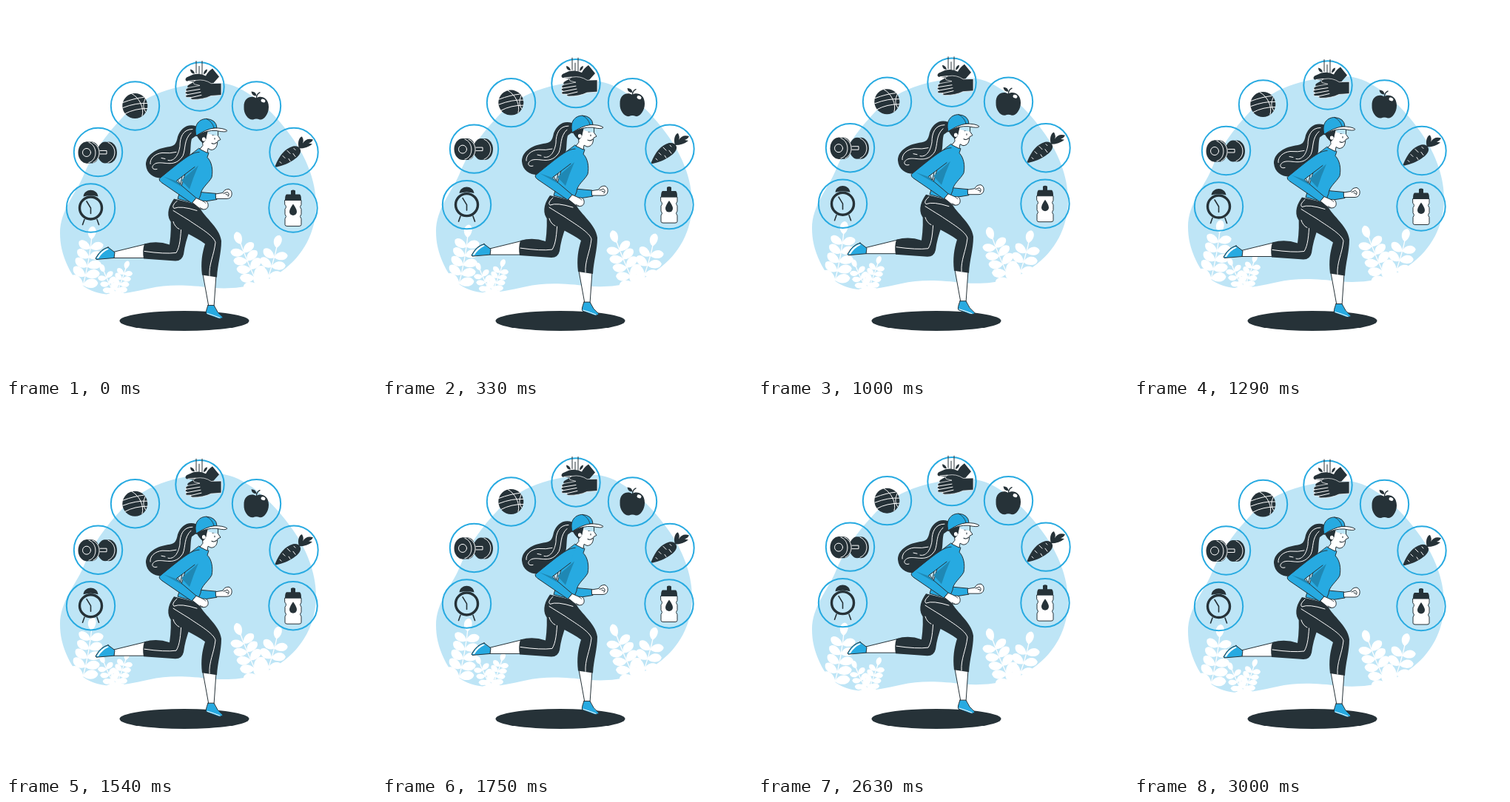
Write an HTML page that moves like this. It is 500 by 500 pixels and loops after 3040 ms.

```html
<!DOCTYPE html>
<html lang="en">
<head>
<meta charset="utf-8">
<title>Healthy habits</title>
<style>
html, body { margin: 0; width: 100%; height: 100%; overflow: hidden; background: #fff; }
svg { display: block; width: 100vw; height: 100vh; }
path, line, circle, ellipse { stroke-linecap: round; stroke-linejoin: round; }
.dark { fill: #263238; }
.blue { fill: #27aae1; }
.white { fill: #fff; }
.edge { stroke: #263238; stroke-width: 1; }
.ink { fill: none; stroke: #263238; }
.thin { fill: none; stroke: #fff; stroke-width: 1; }
.shade { fill: #1f88b4; }
#rings { fill: none; stroke: #27aae1; stroke-width: 2; }
</style>
</head>
<body>
<svg viewBox="0 0 500 500">
  <g id="back">
    <path fill="#bee5f6" d="M73 307C73 277 94 254 104 231C116 201 133 176 160 148C192 116 239 104 289 104C322 106 360 140 388 180C404 203 419 235 419 269C419 305 402 338 372 359C349 377 314 384 279 381C244 377 219 376 193 382C174 386 158 390 138 390C112 388 94 375 84 353C76 336 73 322 73 307Z"/>
    <g id="plants" class="white"></g>
  </g>

  <ellipse class="dark" cx="241" cy="425.5" rx="87.5" ry="13.5"/>

  <g id="front">
    <g id="rings"></g>

    <g id="clock">
      <path class="dark" d="M104.500 258C106 246.500 123 246.500 124.500 258Q114.500 255 104.500 258Z"/>
      <circle class="ink" cx="114.500" cy="273.500" r="15" stroke-width="3.400"/>
      <path class="ink" stroke-width="1.600" d="M109 264.500L114.500 273.500V281M106 289L103.500 296M123 289L125.500 296"/>
    </g>

    <g id="dumbbell">
      <path class="dark" d="M108 184H117C129 186 129 211 117 213H108Z"/>
      <ellipse class="dark" cx="109" cy="198.500" rx="11.500" ry="14.500"/>
      <ellipse class="dark" cx="134" cy="198.500" rx="10.500" ry="14.500"/>
      <ellipse class="dark" cx="139" cy="198.500" rx="11" ry="14.500"/>
      <path class="thin" d="M112 185C124 189 124 209 112 212M117 185C129 190 129 207 118 212M127 196H136V200.500H127M138 185C150 190 150 207 138 212"/>
      <circle class="thin" cx="109" cy="198.500" r="5.500"/>
    </g>

    <g id="ball">
      <circle class="dark" cx="174.300" cy="135.500" r="17"/>
      <path class="thin" d="M170 119C181 125 187 139 184 149M158 131Q174 125 186 124M158 138Q176 131 191 132M161 146Q174 139 191 139M188 126Q183 137 189 144"/>
    </g>

    <g id="wash">
      <path class="ink" d="M257 75V91M265 75V93M261 82V97"/>
      <path class="dark" d="M249 86Q254 87 255 92Q249 92 249 86ZM272 86Q272 91 267 93Q267 87 272 86Z"/>
      <path class="dark" d="M279 85L288 96L280 105L263 109L246 111Q244 109 247 107L254 103L244 102Q241 100 244 97L253 93Q263 91 270 95Q273 89 279 85Z"/>
      <path class="dark" stroke="#fff" stroke-width=".7" d="M291 105V121L277 122Q267 127 252 127Q248 126 250 124L244 124Q241 122 245 120Q240 118 244 116Q241 113 246 111L262 108L254 106Q252 102 257 101Q268 99 277 105Z"/>
      <path class="thin" d="M243 116L262 113M244 120.500L263 117M249 124.500L264 121M246 102L256 101"/>
    </g>

    <g id="apple">
      <path class="dark" d="M338 125C343 121 355 123 355 137C355 147 348 155 343 154Q338 152 334 154C328 155 321 147 321.500 137C321 123 333 121 338 125Z"/>
      <path class="ink" stroke-width="1.400" d="M338.500 126Q338 120 343 117.500"/>
      <path class="dark" d="M338.500 122Q332 122 331.500 116Q338 116 338.500 122Z"/>
      <ellipse class="white" cx="347.500" cy="128.500" rx="3" ry="2.300" transform="rotate(25 347.500 128.500)"/>
    </g>

    <g id="carrot">
      <path class="dark" d="M364 216C369 203 377 193 388 190Q396 189 398 195C400 204 381 215 366 218Q363 218 364 216Z"/>
      <path class="dark" d="M396 193C393 184 397 177 400 177Q403 182 401 186Q406 178 415 181Q413 185 409 186L414 187Q407 193 396 193Z"/>
      <path class="thin" d="M380 196L384 200M374 203L377 206M388 200L391 204M382 207L384 210M389 193L391 195M370 211L372 213"/>
    </g>

    <g id="bottle">
      <path class="dark" d="M385 250Q388 248 391 250V255H397Q399 256 399 263H377Q377 256 379 255H385Z"/>
      <path class="white edge" stroke-width="1.400" d="M377 263H399V269Q396 272 399 275V282Q396 285 399 288V296Q399 298 396 298H380Q377 298 377 296V288Q380 285 377 282V275Q380 272 377 269Z"/>
      <path class="dark" d="M388 268Q393 275 393 278.500A5 5 0 0 1 383 278.500Q383 275 388 268Z"/>
    </g>

    <g id="runner">
      <path class="dark" d="M257 163C245 159 236 166 232 177C230 187 228 190 218 191C200 194 189 203 189 215C190 228 201 234 212 233C224 230 233 224 242 215C252 205 248 190 251 180L258 175Z"/>
      <path class="thin" d="M252 167C239 167 235 178 235 190C233 204 226 211 219 209M250 172C240 181 243 194 239 203C228 220 214 210 203 213C195 216 197 223 204 221M230 198Q222 200 211 199C201 200 194 207 195 214M210 206L215 207"/>

      <path class="blue edge" d="M262 252L284 254L285 262L260 266Z"/>
      <path class="white edge" d="M283.500 254.500L293 253Q295 248 301 248Q306 250 305 256Q304 261 298 261L284 261Z"/>
      <path class="ink" d="M294 254L299 252Q303 254 300 258M297 255L300 256"/>

      <path class="white edge" d="M190 322L145 333L146 341L189 341Z"/>
      <path class="blue edge" d="M138 326.500L147 333.500L146 341L122 343Q120 342 122 340Q128 329 138 326.500Z"/>
      <path class="white" d="M137 328Q128 331 122.500 341.500L125 341.500Q130 333 139 329Z"/>
      <path class="dark" d="M222 282Q224 302 221 323Q204 317 187 322Q184 331 186 342L229 345Q238 345 240 336Q242 320 249 302Z"/>
      <path class="thin" d="M237 296C236 313 235 326 230 334Q215 336 187 332"/>

      <path class="white edge" d="M266 363L274 407H281L284 364Z"/>
      <path class="blue edge" d="M273 405H281Q285 415 293 421Q292 423.500 287 423L271 417Q269 415 273 405Z"/>
      <path class="thin" stroke-width="1.500" d="M272 416Q282 419 289 422"/>
      <path class="dark" d="M227 261L260 269C264 283 289 299 291 318C291 335 286 349 285 367L265 364C263 347 265 335 269 322C256 312 234 304 222 291C216 281 221 269 227 261Z"/>
      <path class="thin" d="M231 264Q223 271 227 274Q236 270 258 277M226 277Q234 282 247 290C260 299 281 311 283 320C281 338 274 349 275 365M226 292Q228 299 234 302"/>

      <path class="blue edge" d="M261 193L274 199L272 205C278 211 280 222 278 232C274 240 263 247 263 256L258 268L232 261L241 231L249 202Z"/>
      <path class="shade" d="M260 216L237 236L248 248Q253 232 260 216Z"/>
      <path fill="#bee5f6" class="edge" stroke-width=".7" d="M232 235L238 231L236 241Z"/>
      <path class="blue edge" d="M261 198C251 198 240 207 207 234Q207 237 210 239L251 267L257 260L230 237L255 218"/>
      <path class="shade" d="M213 231L230 237L240 246Z"/>
      <path class="white edge" d="M252 266L257 260L266 264Q272 263 273 268Q274 273 270 275Q264 277 259 272Z"/>
      <path class="ink" stroke-width=".8" d="M266 264L270 267M262 273L266 275"/>

      <path class="white edge" d="M265 180L266 189L262 194L272 199L273 193L277 195Q283 195 285 189L286 183L290 181L286.500 176V168H266Z"/>
      <path class="dark" d="M257 174L273 169L271 177Q271 182 266 186Q260 181 257 174Z"/>
      <path class="white" d="M265 179Q269 176 270 181Q268 185 265 182Z"/>
      <path class="ink" stroke-width="1.100" d="M278 186Q282 188 284.500 185M282 179V180.500M279 175L284 174"/>
      <path fill="#bee5f6" d="M273 169L286 169L286 176Q280 175 273 173Z"/>
      <path class="blue edge" d="M257 176C253 160 262 153 271 153Q284 154 285 165Q271 167 257 176Z"/>
      <path class="white edge" d="M281 165.500Q294 165 299 169Q298 172 284 169Q271 168 257 176Q270 167 281 165.500Z"/>
      <path class="ink" stroke-width=".8" d="M271 153Q279 157 281 165"/>
    </g>
  </g>
</svg>
<script>
const $ = id => document.getElementById(id);

const rings = [[114.5, 273.5], [124.5, 198], [174.5, 135.5], [262, 109.5], [338.5, 135.5], [389, 198], [388, 273.5]];
$('rings').innerHTML = rings.map(([x, y]) => `<circle cx="${x}" cy="${y}" r="32.7"/>`).join('');

// A stem from base to tip with pairs of leaves and one at the tip
function sprig(x0, y0, x1, y1, bend, pairs, size) {
  const cx = (x0 + x1) / 2 + bend, cy = (y0 + y1) / 2;
  const at = (a, b, c, k) => (1 - k) ** 2 * a + 2 * k * (1 - k) * b + k * k * c;
  const leaf = (x, y, angle, s) =>
    `<path transform="translate(${x} ${y}) rotate(${angle}) scale(${s})" d="M0 0C4-8 16-8 18 0C16 7 5 6 0 0Z"/>`;
  let out = `<path d="M${x0} ${y0}Q${cx} ${cy} ${x1} ${y1}" fill="none" stroke="#fff" stroke-width="1.3"/>`;
  for (let i = 0; i <= pairs; i++) {
    const k = .1 + .74 * i / pairs;
    const x = at(x0, cx, x1, k), y = at(y0, cy, y1, k);
    const dx = (1 - k) * (cx - x0) + k * (x1 - cx), dy = (1 - k) * (cy - y0) + k * (y1 - cy);
    const dir = Math.atan2(dy, dx) * 180 / Math.PI, s = size * (1.1 - .2 * k);
    out += i < pairs ? leaf(x, y, dir - 66, s) + leaf(x, y, dir + 66, s) : leaf(x, y, dir, s);
  }
  return out;
}
$('plants').innerHTML =
  sprig(102, 386, 117, 302, 4, 5, 1.05) +
  sprig(146, 396, 164, 348, 2, 5, .68) +
  sprig(150, 396, 130, 353, -2, 4, .68) +
  sprig(345, 386, 313, 310, -3, 5, 1.05) +
  sprig(347, 386, 368, 316, 4, 4, 1.05);

// Linear rise and fall by 10 units, lowest at 40 ms before the start
function lift(t, period) {
  const k = (t + 40) % period / period;
  return -10 * (1 - Math.abs(2 * k - 1));
}
function draw() {
  const t = performance.now() % 3040;
  $('back').setAttribute('transform', `translate(0 ${lift(t, 3040)})`);
  $('front').setAttribute('transform', `translate(0 ${lift(t, 1520)})`);
  requestAnimationFrame(draw);
}
draw();
</script>
</body>
</html>
```
